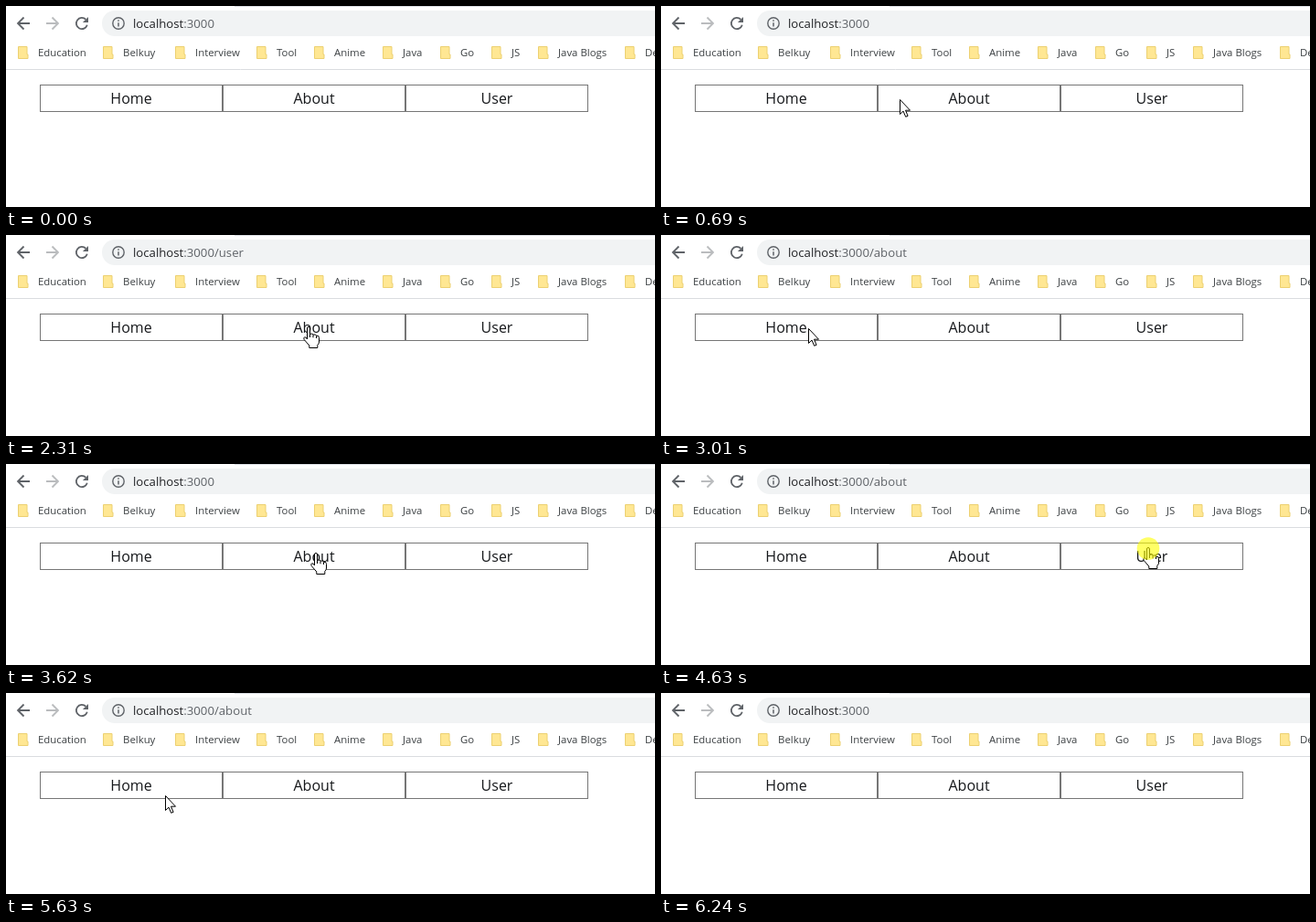
Write an HTML page that moves like this. It is 710 px wide and 220 px high and loops after 6720 ms.

```html
<!DOCTYPE html>
<html lang="en">
<head>
<meta charset="utf-8">
<title>Menu navigation</title>
<style>
  html, body { margin: 0; width: 100%; height: 100%; overflow: hidden; background: #fff; }
  svg { display: block; width: 710px; height: 220px; }
  text { font-family: "Open Sans", "Noto Sans", sans-serif; }
  .url { font-size: 13.2px; fill: #202124; }
  .url tspan { fill: #5f6368; }
  .mark { font-size: 11.4px; fill: #3c4043; }
  .item { font-size: 16px; fill: #16181b; text-anchor: middle; }
  .icon { fill: none; stroke: #5f6368; stroke-width: 1.8; }
  .cursor { fill: #fff; stroke: #000; stroke-width: 1; stroke-linejoin: round; }
</style>
</head>
<body>
<svg viewBox="0 0 710 220">
  <path d="M250 .5H710" stroke="#dee1e6"/>
  <rect x="105" y="5" width="640" height="28" rx="14" fill="#f1f3f4"/>
  <path class="icon" d="M26 19H13.5M19.5 12.5L13 19l6.5 6.5"/>
  <path class="icon" style="stroke:#babcbe" d="M44 19H56.5M50.5 12.5L57 19l-6.5 6.5"/>
  <path class="icon" d="M87.3 14.7A6.1 6.1 0 1 0 88.8 20.8"/>
  <path d="M90 12v6.1h-6.1z" fill="#5f6368"/>
  <circle class="icon" cx="123" cy="19" r="6.2" style="stroke-width:1.4"/>
  <path d="M123 15.2v1.6M123 18.2v4.4" stroke="#5f6368" stroke-width="1.5"/>
  <text class="url" x="139" y="24">localhost<tspan>:3000</tspan><tspan id="path"></tspan></text>
  <g id="bookmarks"></g>
  <path d="M0 69.5H710" stroke="#dadce0"/>
  <g id="menu"></g>
  <g id="pointer">
    <path id="arrow" class="cursor" d="M.5 .5V16.5L4 13.1 6.7 19.3 9.1 18.3 6.5 12.2H11.5Z"/>
    <g id="hand" class="cursor">
      <path d="M-1.5 14V2Q-1.5 .5 0 .5Q1.5 .5 1.5 2V8.5Q4.5 7 5 9.2Q8 8 8.5 10.3Q11.5 9.5 11.5 12.5V17Q11.5 19 9.8 20.5V23.5H.8V21L-4.8 14.5Q-5.8 12.5 -4.4 11.8Q-3 11.3 -1.5 14Z"/>
      <path d="M1.5 8.5V12M5 9.2V12.3M8.5 10.3V13" fill="none"/>
    </g>
    <circle id="flash" cy="1.5" r="12.3" fill="#ff0" opacity=".6"/>
  </g>
</svg>
<script>
const LOOP = 6720, TICK = 77, LEAD = 10;
const LEFT = 37, WIDTH = 200;
const $ = id => document.getElementById(id);

const bookmarks = { Education: 13, Belkuy: 106, Interview: 185, Tool: 274, Anime: 337,
  Java: 412, Go: 475, JS: 531, 'Java Blogs': 582, Dev: 677 };
$('bookmarks').innerHTML = Object.entries(bookmarks).map(([label, x]) => `
  <g transform="translate(${x} 44)">
    <path d="M.5 .5h9.5v8.5h1v4.5h-10.5z" fill="#ffe793" stroke="#ecd071"/>
    <text class="mark" x="22" y="11">${label}</text>
  </g>`).join('');

$('menu').innerHTML = ['Home', 'About', 'User'].map((label, i) => `
  <g transform="translate(${LEFT + i * WIDTH} 86)">
    <rect x=".5" y=".5" width="${WIDTH - 1}" height="29" fill="none" stroke="#767676"/>
    <text class="item" x="${WIDTH / 2}" y="21">${label}</text>
  </g>`).join('');

// Pointer stops, timed in ticks; dip bends the way there downwards
const stops = [
  { x: 236, y: 143, arrive: 1, click: 0 },
  { x: 158, y: 101, arrive: 4, click: 5, page: '' },
  { x: 323, y: 102, arrive: 11.5, click: 15, page: '/about' },
  { x: 536, y: 100, arrive: 20, click: 24, page: '/user' },
  { x: 331, y: 100, arrive: 30, click: 32, page: '/about' },
  { x: 150, y: 102, arrive: 41, click: 41, page: '' },
  { x: 343, y: 97, arrive: 48, click: 52, page: '/about' },
  { x: 533, y: 91, arrive: 58, click: 60, page: '/user' },
  { x: 335, y: 101, arrive: 68, click: 69, page: '/about', dip: 14 },
  { x: 157, y: 101, arrive: 74.2, click: 77, page: '', dip: 14 },
  { x: 429, y: 166, arrive: 80 }
];
const ENTER = 1, EXIT = 81;

const easeInOut = p => p < .5 ? 4 * p ** 3 : 1 - 4 * (1 - p) ** 3;
const mix = (a, b, k) => Math.round(a + (b - a) * k);

function pointerAt(tick) {
  const i = Math.max(1, stops.findLastIndex(stop => stop.click + 1 <= tick) + 1);
  const from = stops[i - 1], to = stops[i];
  const leave = from.click + 1;
  const p = Math.min(1, Math.max(0, (tick - leave) / (to.arrive - leave)));
  const k = easeInOut(p);
  const dip = (to.dip ?? 0) * Math.sin(Math.PI * p);
  return [mix(from.x, to.x, k), mix(from.y + dip, to.y + dip, k)];
}

function isOnLabel(x, y) {
  const fromCentre = (x - LEFT) % WIDTH - WIDTH / 2;
  return Math.abs(fromCentre) <= 23 && y > 90 && y < 112;
}

const show = (id, on) => $(id).setAttribute('visibility', on ? 'visible' : 'hidden');

function draw(time) {
  const tick = Math.floor((time + LEAD) / TICK);
  const [x, y] = pointerAt(tick);
  const present = tick >= ENTER && tick < EXIT;
  const onLabel = isOnLabel(x, y);
  $('path').textContent = stops.findLast(stop => stop.click < tick)?.page ?? '';
  $('pointer').setAttribute('transform', `translate(${x} ${y})`);
  show('hand', present && onLabel);
  show('arrow', present && !onLabel);
  show('flash', present && stops.some(stop => stop.click === tick));
}

const start = performance.now();
function frame() {
  draw((performance.now() - start) % LOOP);
  requestAnimationFrame(frame);
}
frame();
</script>
</body>
</html>
```
